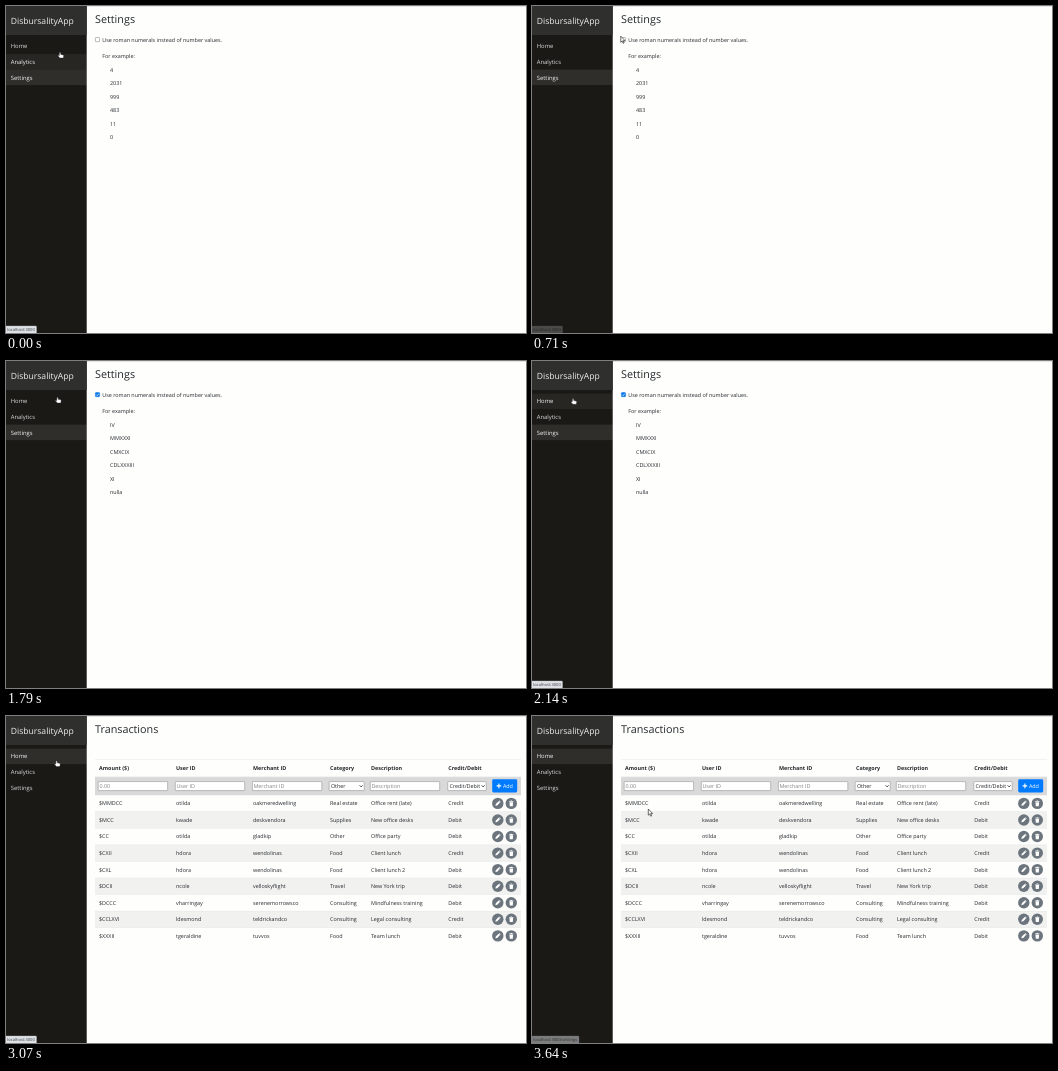
Animation, 520 px wide and 327 px high, one loop 3710 ms. Source, as an HTML page:

```html
<!DOCTYPE html>
<html lang="en">
<head>
<meta charset="utf-8">
<title>Transactions and settings</title>
<style>
html, body { margin: 0; width: 100%; height: 100%; overflow: hidden; background: #fefefd; }
svg { display: block; width: 100vw; height: 100vh; }
text { font-family: "Open Sans", "Noto Sans", sans-serif; font-size: 5.41px; fill: #24282c; text-rendering: geometricPrecision; white-space: pre; }
.title { font-size: 10.8px; }
.brand { font-size: 8.6px; fill: #eee; }
.nav { font-size: 5.87px; }
.bold { font-weight: 700; }
.hint { fill: #858585; }
.status { font-size: 4.1px; fill: #3c4043; }
.light { fill: #fff; }
</style>
</head>
<body>
<svg id="stage" viewBox="0 0 520 327"></svg>
<script>
const LOOP = 3710, STEP = 71.35;
const NS = 'http://www.w3.org/2000/svg';
const stage = document.getElementById('stage');

function add(parent, tag, attrs = {}, content) {
  const el = document.createElementNS(NS, tag);
  for (const key in attrs) el.setAttribute(key, attrs[key]);
  if (content !== undefined) el.textContent = content;
  parent.appendChild(el);
  return el;
}
const rect = (p, x, y, width, height, fill, more) => add(p, 'rect', { x, y, width, height, fill, ...more });
const label = (p, x, y, str, cls = '') => add(p, 'text', { x, y, class: cls }, str);
const group = (p = stage, attrs) => add(p, 'g', attrs);
const path = (p, d, more) => add(p, 'path', { d, fill: 'none', ...more });
const show = (el, on) => el.setAttribute('visibility', on ? 'visible' : 'hidden');

rect(stage, 0, 0, 520, 327, '#fefefd');
rect(stage, 81, 0, 439, 0.8, '#dededc');

// Sidebar
rect(stage, 0, 0, 80.7, 327, '#1a1916');
rect(stage, 0, 0, 80.7, 29, '#2f2f2d');
label(stage, 4.7, 17.7, 'DisbursalityApp', 'brand');
const nav = ['Home', 'Analytics', 'Settings'].map((name, i) => ({
  back: rect(stage, 0, 32.6 + i * 15.5, 80.7, 15.5, '#fff'),
  text: label(stage, 4.8, 42.4 + i * 15.6, name, 'nav')
}));

// Settings page
const settings = group();
label(settings, 89, 16.7, 'Settings', 'title');
const box = rect(settings, 89.4, 31.5, 4.2, 4.2, '#fff', { rx: 0.7, 'stroke-width': 0.5 });
const tick = path(settings, 'M90.3 33.7l0.9 0.9 1.6-2', { stroke: '#fff', 'stroke-width': 0.7 });
label(settings, 96.3, 35.6, 'Use roman numerals instead of number values.');
label(settings, 96.3, 52, 'For example:');
const decimal = ['4', '2031', '999', '483', '11', '0'];
const roman = ['IV', 'MMXXXI', 'CMXCIX', 'CDLXXXIII', 'XI', 'nulla'];
const samples = decimal.map((n, i) => label(settings, 104, 65.5 + i * 13.5, n));

// Transactions page
const home = group();
const cols = [93, 170, 247, 324, 365, 442.3];
label(home, 89, 16.7, 'Transactions', 'title');
rect(home, 89, 43.3, 426, 0.4, '#dee2e6');
['Amount ($)', 'User ID', 'Merchant ID', 'Category', 'Description', 'Credit/Debit']
  .forEach((s, i) => label(home, cols[i], 54, s, 'bold'));
rect(home, 89, 61, 426, 18, '#d9d9d9');
rect(home, 89, 60.6, 426, 0.7, '#dee2e6');

const field = (x, w) => rect(home, x, 65.6, w, 9, '#fff', { rx: 0.5, stroke: '#858585', 'stroke-width': 0.5 });
const amount = field(92.2, 69.4);
[169.3, 246.4, 364.3].forEach(x => field(x, 69.4));
[[0, '0.00'], [1, 'User ID'], [2, 'Merchant ID'], [4, 'Description']]
  .forEach(([c, s]) => label(home, cols[c] + 0.4, 72, s, 'hint'));
[[323.2, 35, 'Other'], [441.8, 38.4, 'Credit/Debit']].forEach(([x, w, s]) => {
  field(x, w);
  label(home, x + 1.7, 72, s);
  path(home, `M${x + w - 4.6} 69.3l1.5 1.6 1.5-1.6`, { stroke: '#222', 'stroke-width': 0.8 });
});
rect(home, 486.2, 63.3, 25, 13.2, '#007bff', { rx: 1.4 });
path(home, 'M490.6 69.9h4.6M492.9 67.6v4.6', { stroke: '#fff', 'stroke-width': 1.1 });
label(home, 496.9, 72, 'Add', 'light');

function roundButton(x, y, icon) {
  add(home, 'circle', { cx: x, cy: y, r: 5.7, fill: '#6c757d' });
  add(home, 'path', { d: icon, fill: '#fff', transform: `translate(${x} ${y})` });
}
const pencil = 'M-2.4 2.4l.4-1.8 2.8-2.8 1.4 1.4-2.8 2.8zM1.1-2.4l.5-.4 1.3 1.3-.4.5z';
const trash = 'M-2.1-2.3h1.3l.3-.5h1l.3.5h1.3v.7h-4.2zM-1.8-1.2h3.6l-.3 4h-3z';

const rows = `$MMDCC|otilda|oakmeredwelling|Real estate|Office rent (late)|Credit
$MCC|kwade|deskvendora|Supplies|New office desks|Debit
$CC|otilda|gladkip|Other|Office party|Debit
$CXII|hdora|wendolinas|Food|Client lunch|Credit
$CXL|hdora|wendolinas|Food|Client lunch 2|Debit
$DCII|ncole|velloskyflight|Travel|New York trip|Debit
$DCCC|vharringay|serenemorrowsco|Consulting|Mindfulness training|Debit
$CCLXVI|ldesmond|teldrickandco|Consulting|Legal consulting|Credit
$XXXII|tgeraldine|tuvvos|Food|Team lunch|Debit`.split('\n');
rows.forEach((row, i) => {
  const y = 87.4 + i * 16.56;
  if (i % 2) rect(home, 89, y - 8.3, 426, 16.56, '#f1f1f0');
  rect(home, 89, y - 8.4, 426, 0.4, '#dee2e6');
  row.split('|').forEach((s, c) => label(home, cols[c], y + 1.95, s));
  roundButton(491.8, y, pencil);
  roundButton(505.3, y, trash);
});

// Link address bubble
const status = group();
const bubble = rect(status, -1, 320, 32, 8, '#dee1e6', { rx: 0.8, stroke: '#b4b7ba', 'stroke-width': 0.4 });
const address = label(status, 1.2, 325, '', 'status');

// Pointers, each with its hot spot at 0,0
const ink = { fill: '#fff', stroke: '#222', 'stroke-width': 0.65, 'stroke-linejoin': 'round' };
const pointers = {
  arrow: path(stage, 'M0 0v6.2l1.4-1.3 1 2.3 1-.4-1-2.3h1.9z', ink),
  hand: path(stage, 'M-.5.2q.6-.6 1 0l.3 1.9 2.3.5q.7.2.6 1l-.4 2.2h-3.5l-1.9-2.4q.2-.7 1.3 0z', { ...ink, 'stroke-width': 0.4 }),
  beam: path(stage, 'M-1-3h2M0-3v6M-1 3h2', { stroke: '#222', 'stroke-width': 0.6 })
};

// Keys are [step, value...]
const moves = [
  [0, 54, 46.3], [1, 54, 46.3], [3, 68, 38], [5, 84, 27.8], [9, 87.5, 29], [11, 90, 31.3],
  [22, 90, 31.3], [24, 62, 35], [26, 41, 37.5], [42, 41, 37.5], [44, 60, 52],
  [46, 87.4, 69.3], [47, 100, 72], [48, 110, 82], [50, 116.3, 93], [52, 116.3, 93]
];
const fades = [[0, 1], [7, 1], [11, 0], [27, 0], [30, 1], [47, 1], [51, 0.5], [52, 0.4]];

function at(keys, k) {
  const i = Math.max(1, keys.findIndex(key => key[0] >= k));
  const a = keys[i - 1], b = keys[i];
  const f = (k - a[0]) / (b[0] - a[0]);
  return a.slice(1).map((v, n) => v + (b[n + 1] - v) * f);
}

function hovered(k) {
  if (k < 3 || (k >= 44 && k <= 46)) return 1;
  return k >= 26 && k < 44 ? 0 : -1;
}

function draw(time) {
  const k = Math.min(51, Math.floor((time % LOOP + 5) / STEP));
  const onHome = k >= 33, checked = k >= 18;
  const [x, y] = at(moves, k);

  show(home, onHome);
  show(settings, !onHome);
  nav.forEach((item, i) => {
    const active = i === (onHome ? 0 : 2), hover = i === hovered(k);
    item.back.setAttribute('opacity', active ? 0.09 : hover ? 0.055 : 0);
    item.text.style.fill = active || hover ? '#f4f4f4' : '#dcdcdb';
  });

  const overBox = k >= 11 && k < 23;
  const blue = overBox ? '#0b58b5' : '#0875e8';
  box.setAttribute('fill', checked ? blue : '#fff');
  box.setAttribute('stroke', checked ? blue : overBox ? '#4f4f4f' : '#767676');
  tick.setAttribute('opacity', checked ? 1 : 0);
  samples.forEach((el, i) => { el.textContent = (checked ? roman : decimal)[i]; });

  const inField = onHome && x > 92 && x < 162 && y > 65 && y < 75;
  amount.setAttribute('stroke', inField ? '#4f4f4f' : '#858585');

  const page = k < 44 ? '' : k < 45 ? '/analytics' : '/settings';
  address.textContent = 'localhost:3000' + page;
  bubble.setAttribute('width', page ? 48 : 31.5);
  status.setAttribute('opacity', at(fades, k)[0]);

  const kind = inField ? 'beam' : x < 80.7 && y > 32.6 ? 'hand' : 'arrow';
  for (const name in pointers) {
    show(pointers[name], name === kind);
    pointers[name].setAttribute('transform', `translate(${x} ${y})`);
  }
}

const start = performance.now();
function tickFrame() {
  draw(performance.now() - start);
  requestAnimationFrame(tickFrame);
}
tickFrame();
</script>
</body>
</html>
```
